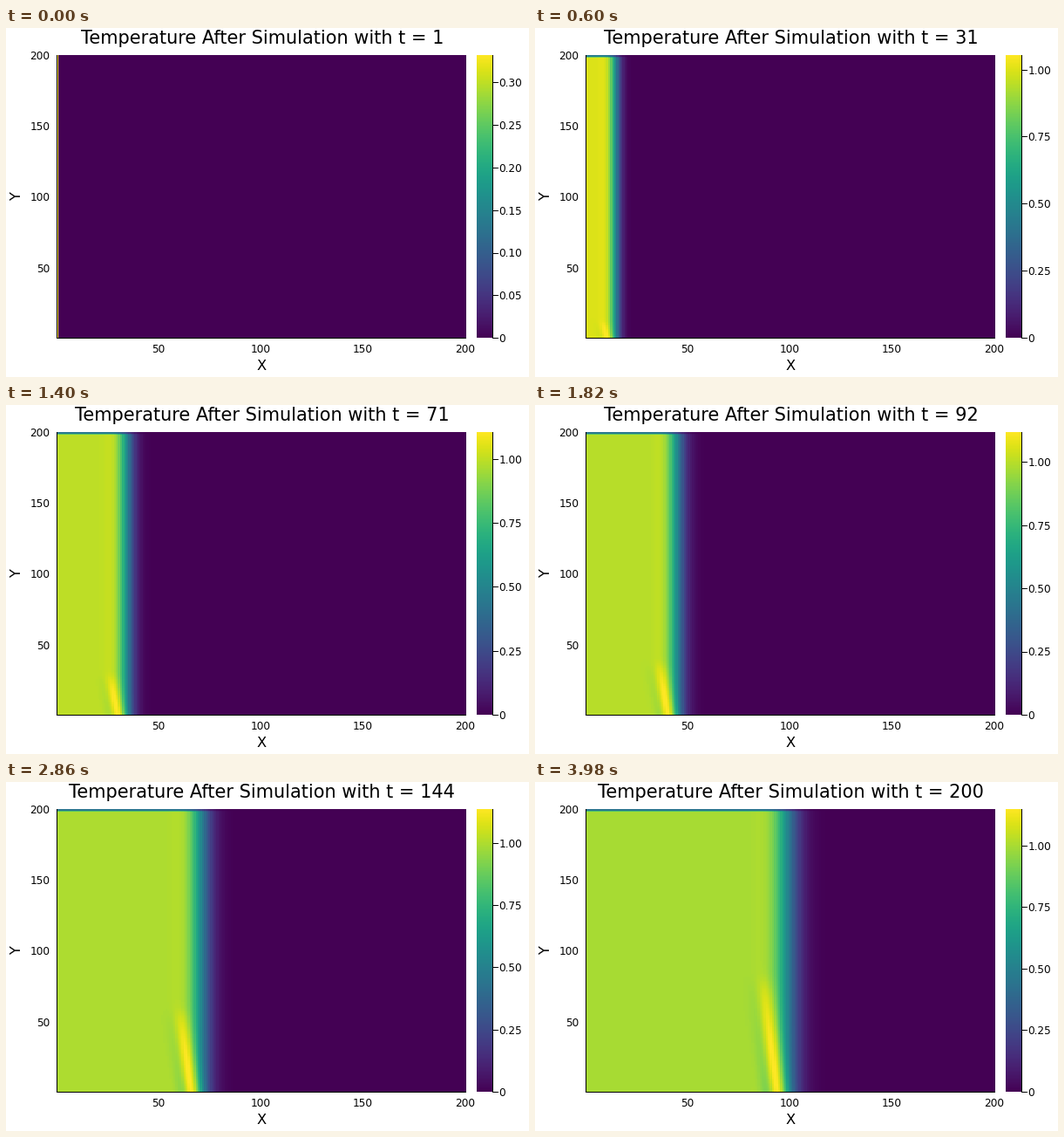
Animation, 600 px wide and 400 px high, one loop 4000 ms. Source, as a matplotlib script:

```python
import numpy as np
import matplotlib.pyplot as plt
from matplotlib.animation import FuncAnimation

N = 200
LEFT, RIGHT, TOP, BOTTOM = 58.5, 528, 30.5, 355.5
BAR_L, BAR_R = 540, 558
TITLE_PX, GUIDE_PX, TICK_PX = 20.86, 16.2, 12.1

plt.rcParams["font.family"] = "DejaVu Sans"
fig = plt.figure(figsize=(6, 4), dpi=100, facecolor="white")
ax = fig.add_axes([0, 0, 1, 1])

x = np.arange(1, N + 1)
y = np.arange(N)[:, None]


def advect(u=0.5, w=0.18, tau=1.23):
    """Lattice Boltzmann front carried in from the left wall, per step."""
    share = np.array([1 - 2 * w, w + u / 2, w - u / 2])[:, None]
    wall = (share[1, 0] - 1 / 3) / share[2, 0]
    f = np.zeros((3, N))
    out = []
    for _ in range(N):
        f += (share * f.sum(axis=0) - f) / tau
        leaving = f[2, 0]
        f[1, 1:] = f[1, :-1].copy()
        f[2, :-1] = f[2, 1:].copy()
        f[1, 0] = 1 / 3 + wall * leaving
        f[2, -1] = 0
        out.append(f.sum(axis=0))
    return out


profiles = advect()


def ripple(q):
    """Crest with a weak trough behind it."""
    behind = np.cos(2 * np.pi * q / 18) * np.exp(-(q / 6) ** 2)
    ahead = np.exp(-(q / 5) ** 2)
    return np.where(q < 0, behind, ahead)


def field(t):
    base = profiles[t - 1]
    peak = max(base.max(), 1.22 - 0.789 * t ** -0.46 if t > 7 else 0)
    T = np.repeat(base[None, :], N, axis=0)

    # wave rising from the bottom wall along the front
    if t > 7:
        scale = (t / N) ** 0.25
        crest = 0.5 * t - 0.8 - 4.4 * scale
        eta = y / (0.4 * t)
        lean = 0.5 * np.sqrt(t) * eta
        floor = ripple((x - crest) / scale)
        m = floor > 0.15
        amp = np.min((peak - base[m]) / floor[m])
        cut = np.clip((y - 0.4 * t) / (1 + 0.015 * t), -40, 40)
        fade = np.clip(1 - 0.85 * eta, 0, 1) / (1 + np.exp(cut))
        T = T + amp * fade * ripple((x - crest + lean) / scale)

    # thin cold layer at the top wall
    if t > 1:
        T[-1] *= 0.45
        T[-2] *= 0.83
    return np.clip(T, 0, peak), peak


def label(px, py, s, size, **kw):
    return ax.text(px, py, s, fontsize=size * 0.72, color="black",
                   va="baseline", **kw)


def px_x(v):
    return LEFT + (v - 0.5) * (RIGHT - LEFT) / N


def px_y(v):
    return BOTTOM - (v - 0.5) * (BOTTOM - TOP) / N


def rule(x0, y0, w, h):
    r = plt.Rectangle((x0, y0), w, h, fc="black", ec="none", zorder=3)
    return ax.add_patch(r)


def image(data, extent):
    return ax.imshow(data, cmap="viridis", origin="lower", aspect="auto",
                     interpolation="nearest", extent=extent)


heat = image(np.zeros((N, N)), (58, 528, 356, 31))
image(np.linspace(0, 1, 256)[:, None], (BAR_L, BAR_R, 355, 31))
ax.set_xlim(0, 600)
ax.set_ylim(400, 0)
ax.axis("off")

rule(58, 31, 1, 325)
rule(58, 355, 470, 1)
rule(BAR_R, 31, 1, 325)

for v in (50, 100, 150, 200):
    label(px_x(v), 371.7, str(v), TICK_PX, ha="center")
    label(50.5, px_y(v) + 4.6, str(v), TICK_PX, ha="right")
label(293.3, 392, "X", GUIDE_PX, ha="center")
ax.text(12.2, 193.3, "Y", fontsize=GUIDE_PX * 0.72, rotation=90,
        ha="center", va="center")
title = label(293.9, 18, "", TITLE_PX, ha="center")

marks = [(rule(BAR_R, 0, 7, 1), label(565.7, 0, "", TICK_PX, ha="left"))
         for _ in range(8)]


def bar_step(peak):
    for limit, step in ((0.4, 0.05), (0.7, 0.1), (0.95, 0.2)):
        if peak < limit:
            return step, 2 if step == 0.05 else 1
    return 0.25, 2


def draw(i):
    t = i + 1
    T, peak = field(t)
    heat.set_data(T)
    heat.set_clim(0, peak)
    title.set_text(f"Temperature After Simulation with t = {t}")
    step, digits = bar_step(peak)
    for k, (dash, text) in enumerate(marks):
        v = k * step
        shown = v <= peak
        py = BOTTOM - v / peak * (BOTTOM - TOP)
        dash.set_visible(shown)
        text.set_visible(shown)
        dash.set_y(round(py - 0.5))
        text.set_y(py + 4.4)
        text.set_text(f"{v:.{digits}f}" if k else "0")
    return []


anim = FuncAnimation(fig, draw, frames=N, interval=20, repeat=True,
                     repeat_delay=0, blit=False)
plt.show()
```
